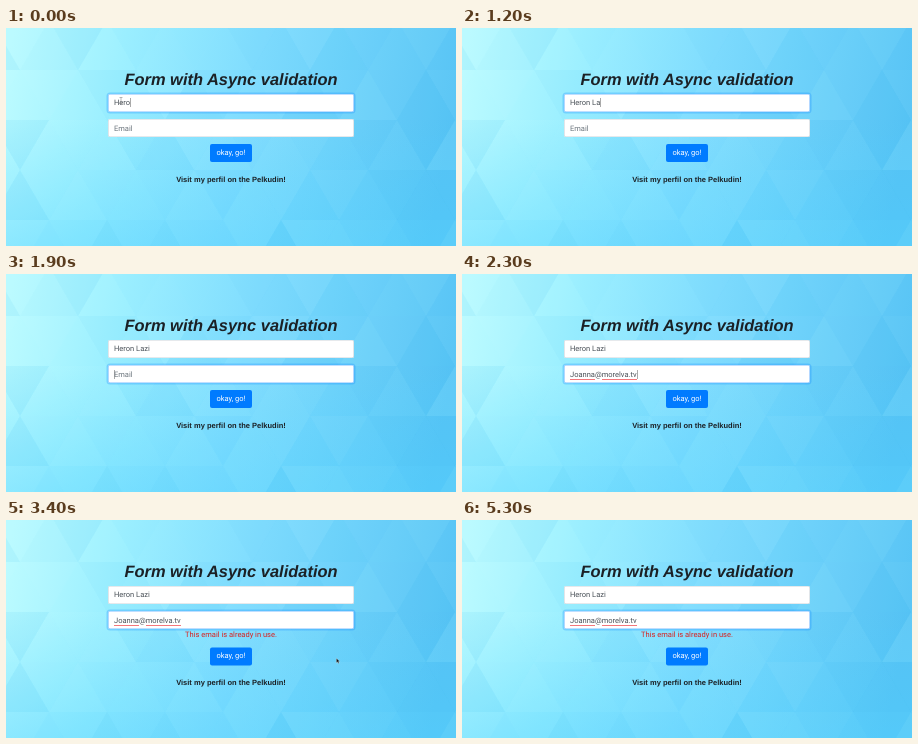
These frames come from a looping animation (450x218 px, 5.6 s). An HTML page with a canvas:

```html
<!DOCTYPE html>
<html lang="en">
<head>
<meta charset="utf-8">
<title>Form with Async validation</title>
<style>
  html, body { margin: 0; width: 100%; height: 100%; overflow: hidden; }
  body { position: relative; font: 7.52px/18px Roboto, sans-serif; color: #495057; background: #74d8fc;
    text-rendering: geometricPrecision; }
  body > * { position: absolute; box-sizing: border-box; white-space: pre; }
  #backdrop { left: 0; top: 0; }
  h1, .link { left: 0; width: 450px; margin: 0; text-align: center; color: #1b2025;
    font-family: "Liberation Sans", Arial, sans-serif; font-weight: bold; }
  h1 { top: 42px; font-size: 16.45px; line-height: 20px; font-style: italic; }
  .link { top: 143px; font-size: 7.52px; }
  .field { left: 102px; width: 246px; height: 18px; padding-left: 6px; border-radius: 2px; background: #fff; }
  #name { top: 66px; }
  #email { top: 91px; line-height: 19px; }
  .placeholder { color: #6c757d; }
  .caret { display: inline-block; width: 1px; height: 9px; margin-right: -1px; vertical-align: -1.5px; background: #aaa; }
  .misspelt { border-bottom: .8px solid #f4777b; }
  .error { left: 0; width: 450px; top: 106px; text-align: center; color: #d9201f; }
  .button { left: 204px; top: 116px; width: 42px; height: 18px; border-radius: 2px;
    text-align: center; color: #fff; background: #007bff; }
  svg { overflow: visible; left: 0; top: 0; }
</style>
</head>
<body>
<canvas id="backdrop" width="450" height="218"></canvas>
<h1>Form with Async validation</h1>
<div class="field" id="name"></div>
<div class="field" id="email"></div>
<div class="error">This email is already in use.</div>
<div class="button">okay, go!</div>
<div class="link">Visit my perfil on the Pelkudin!</div>
<svg id="beam" width="450" height="218"><path d="M113.5 69.5h3M115 69.5v6M113.5 75.5h3" fill="none" stroke="#777" stroke-width=".5"/></svg>
<svg id="pointer" width="8" height="8"><path d="M0 0V4.6L1.2 3.7 2 5.4 2.7 5 2 3.4H3.4Z" fill="#111" stroke="#fff" stroke-width=".3"/></svg>
<script>
const LOOP = 5600, STEP = 100;
const NAME = "Heron Lazi";
const KEY_TIMES = [300, 600, 900, 1100, 1300, 1400];
const FOCUS_AT = 1650, FOCUS_MS = 150, EMAIL_AT = 2300, ERROR_AT = 3300;
const CARET = '<span class="caret"></span>';
const EMAIL = '<span class="misspelt">Joanna</span>@<span class="misspelt">morelva.tv</span>';

const find = selector => document.querySelector(selector);
const [nameField, emailField, error, button, link, beam, pointer] =
  ["#name", "#email", ".error", ".button", ".link", "#beam", "#pointer"].map(find);
const clamp = x => Math.max(0, Math.min(1, x));
const show = (element, visible) => { element.style.visibility = visible ? "visible" : "hidden"; };

function paintBackdrop() {
  const ctx = find("#backdrop").getContext("2d");
  const fill = (gradient, stops) => {
    stops.forEach(([at, color]) => gradient.addColorStop(at, color));
    ctx.fillStyle = gradient;
    ctx.fillRect(0, 0, 450, 218);
  };
  fill(ctx.createLinearGradient(0, 40, 440, 130),
    [[0, "#bcfbff"], [.25, "#9cefff"], [.55, "#80dcfe"], [1, "#5ac5f5"]]);
  fill(ctx.createLinearGradient(0, 90, 0, 218),
    [[0, "rgba(80,210,255,0)"], [1, "rgba(80,210,255,.4)"]]);

  let seed = 11;
  const random = () => (seed = seed * 16807 % 2147483647) / 2147483647;
  const half = 29, height = 50;
  for (let row = 0; row < 5; row++) {
    const top = row * height - 8;
    for (let col = -2; col < 17; col++) {
      const up = (row + col) % 2 === 0, x = col * half + 14;
      const apex = up ? top : top + height, base = up ? top + height : top;
      const tone = random() * 2 - 1;
      ctx.fillStyle = tone > 0 ? `rgba(190,246,255,${tone * .08})` : `rgba(30,160,225,${-tone * .08})`;
      ctx.beginPath();
      ctx.moveTo(x, base);
      ctx.lineTo(x + half, apex);
      ctx.lineTo(x + 2 * half, base);
      ctx.fill();
    }
  }
}

function setFocus(field, amount) {
  const mix = (from, to) => Math.round(from + (to - from) * amount);
  field.style.boxShadow = `inset 0 0 0 .6px rgb(${mix(206, 128)},${mix(212, 189)},${mix(218, 255)}),
    0 0 0 ${1.5 * amount}px rgba(0,123,255,.25)`;
}

function render(time) {
  const t = Math.floor(time % LOOP / STEP) * STEP;
  const focus = clamp((t - FOCUS_AT) / FOCUS_MS);
  const typed = 4 + KEY_TIMES.filter(at => t >= at).length;
  const blinkOn = t < EMAIL_AT || Math.floor((t - EMAIL_AT) / 600) % 2 === 0;
  const caret = blinkOn ? CARET : "";

  nameField.innerHTML = NAME.slice(0, typed) + (focus ? "" : caret);
  emailField.innerHTML = t >= EMAIL_AT ? EMAIL + caret
    : (focus ? caret : "") + '<span class="placeholder">Email</span>';
  setFocus(nameField, 1 - focus);
  setFocus(emailField, focus);

  const failed = t >= ERROR_AT;
  show(error, failed);
  button.style.transform = link.style.transform = failed ? "translateY(11.4px)" : "none";

  show(beam, t < KEY_TIMES[0]);
  show(pointer, failed && t < 4500);
  const travel = clamp((t - 4200) / 200);
  pointer.style.transform = `translate(${330.4 - 135 * travel}px,${138.2 + 56 * travel}px)`;
}

paintBackdrop();
const start = performance.now();
function tick() {
  render(performance.now() - start);
  requestAnimationFrame(tick);
}
tick();
</script>
</body>
</html>
```
